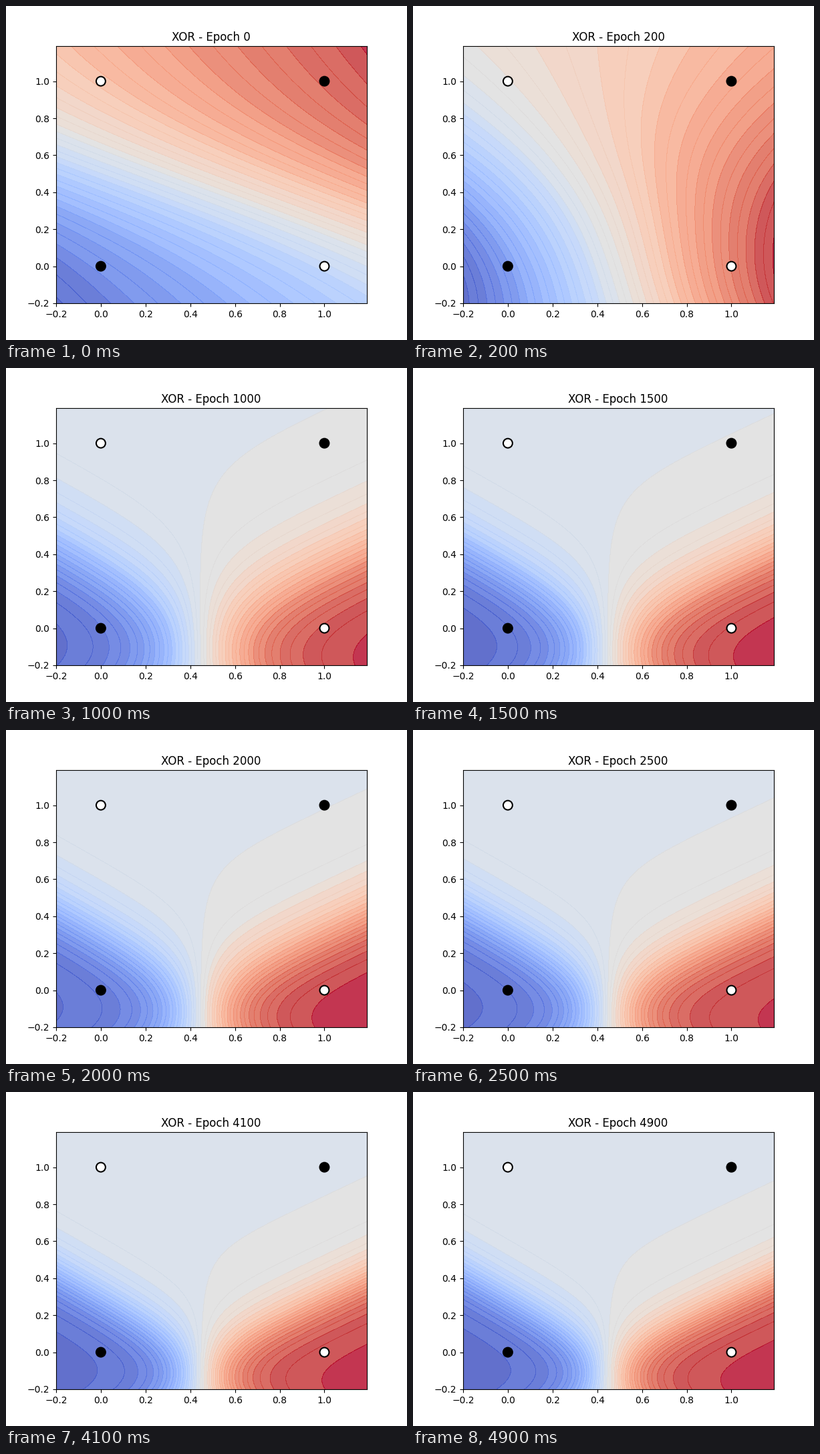
A matplotlib script that plays this animation: 600 by 500 pixels, repeating every 5 s.

```python
import numpy as np
import matplotlib.pyplot as plt
from matplotlib.animation import FuncAnimation
from matplotlib.colors import ListedColormap

FRAMES, INTERVAL, EPOCHS_PER_FRAME = 50, 100, 100
TONES = 24
SEAM_X, SEAM_Y = 0.445, -0.122

axis = -0.2 + 0.01 * np.arange(140)
xx, yy = np.meshgrid(axis, axis)


def sigmoid(v):
    return 1 / (1 + np.exp(-v))


def stepped_coolwarm():
    """Coolwarm rounded to a limited number of tones."""
    t = np.arange(256) / 256
    return ListedColormap(plt.get_cmap("coolwarm")(np.round(t * TONES) / TONES))


def untrained_logit():
    ramp = np.tanh(2.5 * (yy + 0.2 * xx - 0.5))
    return 0.65 * (0.27 * ramp + 0.22 * xx + 0.11 * yy - 0.18)


def trained_logit(epoch):
    """Two opposed hidden units whose weights grow with log time."""
    age = np.log(epoch / 600)
    dx, dy = xx - SEAM_X, yy - SEAM_Y
    right = sigmoid((2.6 + 1.34 * age) * dx - (4.7 + 2.27 * age) * dy)
    left = sigmoid(-(3.1 + 1.55 * age) * dx - (4.9 + 2.05 * age) * dy)
    return (3.3 + 0.15 * age) * (right - left) - 0.09


def prediction(epoch):
    if epoch == 0:
        return sigmoid(untrained_logit())
    k = min(epoch / 400, 1)
    k = k * k * (3 - 2 * k)
    return sigmoid((1 - k) * untrained_logit() + k * trained_logit(epoch))


cmap = stepped_coolwarm()
fig, ax = plt.subplots(figsize=(6, 5), dpi=100)


def update(frame):
    epoch = frame * EPOCHS_PER_FRAME
    ax.clear()
    ax.contourf(xx, yy, prediction(epoch), levels=50, cmap=cmap, alpha=0.8)
    ax.scatter([0, 0, 1, 1], [0, 1, 0, 1], c=[0, 1, 1, 0], cmap="gray",
               edgecolors="k", linewidths=1.5, s=100)
    ax.set_xlim(axis[0], axis[-1])
    ax.set_ylim(axis[0], axis[-1])
    ax.set_title(f"XOR - Epoch {epoch}", x=0.499)


anim = FuncAnimation(fig, update, frames=FRAMES, interval=INTERVAL,
                     init_func=lambda: None, repeat=True, repeat_delay=0)
plt.show()
```
